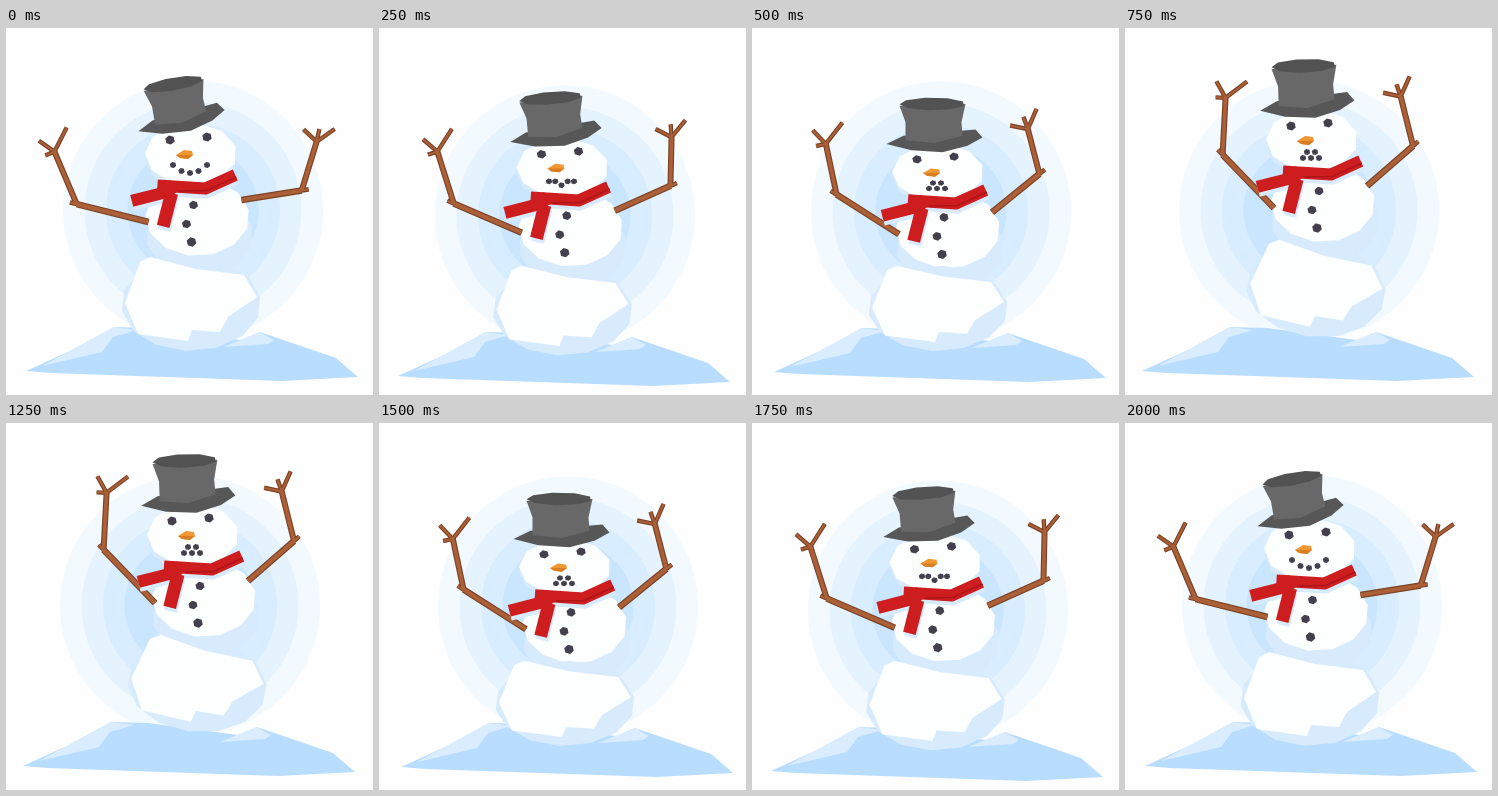
An HTML page with a canvas for the animation above (2250 ms loop, 367x367 px).

```html
<!DOCTYPE html>
<html lang="en">
<head>
<meta charset="utf-8">
<title>Jumping snowman</title>
<style>
  html, body { margin: 0; width: 100%; height: 100%; overflow: hidden; background: #fefefe; }
  canvas { display: block; width: 100vw; height: 100vh; }
</style>
</head>
<body>
<canvas width="367" height="367"></canvas>
<script>
const ctx = document.querySelector('canvas').getContext('2d');
const STEP = 250, RAD = Math.PI / 180;
const SHADE = '#d8ebfd', SNOW = '#fdfefe', COAL = '#433f4c', RED = '#cd1d1f';

// base: foot of the body; chest: sideways offset of the torso;
// left, right: angles of upper arm and forearm in degrees.
const stand = { ground: [0, 0], base: [186, 323], chest: 5.5, roll: 0, stretch: 1,
  tilt: -9.7, pout: 0, left: [194, 247], right: [-9, -73] };
const crouch = { ground: [2, 1], base: [187, 323], chest: 9, roll: 0, stretch: .908,
  tilt: 0, pout: 1, left: [212.5, 258], right: [-39, -104.5] };
const leap = { ground: [-3, 0], base: [188, 309], chest: 10, roll: 5, stretch: 1,
  tilt: -2, pout: 1, left: [226, 273], right: [-41, -104] };

const lerp = (a, b, t) => Array.isArray(a) ? a.map((v, i) => lerp(v, b[i], t)) : a + (b - a) * t;
const mix = (a, b, t) =>
  Object.fromEntries(Object.keys(stand).map(key => [key, lerp(a[key], b[key], t)]));

const sink = { ...mix(stand, crouch, .5), shift: [-2, 4.5] };
const peak = { ...mix(crouch, leap, 1.08), shift: [2.4, 3] };
const poses = [stand, sink, crouch, leap, peak, leap, crouch, sink, stand];

function trace(p) {
  ctx.beginPath();
  for (let i = 0; i < p.length; i += 2) ctx.lineTo(p[i], p[i + 1]);
}

function poly(color, ...p) {
  trace(p);
  ctx.fillStyle = color;
  ctx.fill();
}

function line(color, width, ...p) {
  trace(p);
  ctx.strokeStyle = color;
  ctx.lineWidth = width;
  ctx.stroke();
}

// Ellipse cut into n straight facets
function blob(color, x, y, rx, ry, n) {
  const p = [];
  for (let i = 0; i < n; i++) {
    const a = .3 + i / n * 2 * Math.PI;
    p.push(x + rx * Math.cos(a), y + ry * Math.sin(a));
  }
  poly(color, ...p);
}

const coal = (x, y, r) => blob(COAL, x, y, r, r * .95, 6);

function part(x, y, deg, scaleY, paint) {
  ctx.save();
  ctx.translate(x, y);
  ctx.scale(1, scaleY);
  ctx.rotate(deg * RAD);
  paint();
  ctx.restore();
}

function scenery() {
  for (let i = 0; i < 4; i++)
    blob(`hsl(208 100% ${97.5 - 2.6 * i}%)`, 187, 182.5, 130 - 21.5 * i, 130 - 21.5 * i, 90);
  poly('#b8ddff', 20, 343, 66, 322, 108, 299, 145, 300, 235, 312, 254, 304,
    330, 330, 352, 349, 275, 353, 45, 345);
  poly('#d9edff', 36, 338, 108, 299, 131, 302, 107, 309, 96, 324);
  poly('#d9edff', 217, 319, 254, 304, 268, 312, 262, 316);
}

function ball() {
  blob(SHADE, -1, -47, 70, 47, 14);
  poly(SNOW, -52, -89, -42, -94, 4, -82, 52, -76, 65, -54, 36, -34, 28, -19,
    0, -21, -4, -10, -54, -17, -67, -48);
}

function torso() {
  blob(SHADE, 2, 18, 54, 42, 12);
  blob(SNOW, 0, 0, 52, 39, 13);
  coal(-4, -12, 4.7);
  coal(-11, 7, 4.7);
  coal(-6, 25, 5);
}

function arm(x, y, upper, forearm, [a, b], fingers) {
  const reach = (x, y, deg, len) => [x + len * Math.cos(deg * RAD), y + len * Math.sin(deg * RAD)];
  const elbow = reach(x, y, a, upper), wrist = reach(...elbow, b, forearm);
  for (const [color, trim] of [['#7d4326', 0], ['#ab6038', 2.4]]) {
    line(color, 6.6 - trim, x, y, ...elbow);
    line(color, 4.6 - trim, ...elbow, ...reach(...elbow, a, 7));
    line(color, 6 - trim, ...elbow, ...wrist);
    for (const [turn, len] of fingers)
      line(color, 4.4 - trim, ...wrist, ...reach(...wrist, b + turn, len));
  }
}

function face(pout) {
  coal(-21, -15, 4.9);
  coal(16, -18, 4.9);
  poly('#ee9733', -15, 0, -7, -5, 1, -4, 2, 0, -3, 4, -11, 3);
  poly('#d97f22', -15, 0, 2, 0, -3, 4, -11, 3);
  for (let i = 0; i < 5; i++) {
    const s = i / 2 - 1;
    coal(lerp(17, 8, pout) * s - 1, lerp(18 - 8 * s * s, 17 - 6 * (i % 2), pout), 3.3);
  }
}

function hat() {
  poly('#575757', -48, 4, -31, -5, 41, -12, 48, -3, 33, 6, 8, 13, -23, 11);
  poly('#686868', -35, -38, -29, -20, -29, 0, 0, 3, 28, -5, 27, -20, 31, -40);
  blob('#525252', -2, -40, 33, 7, 9);
}

function scarfShape(color) {
  line(color, 12, -24, -4, 24, 0, 54, -13);
  line(color, 12, -50, 11, -12, 2);
  line(color, 13, -10, 4, -19, 37);
  blob(color, -12, -1, 9, 8, 7);
}

function scarf() {
  ctx.translate(1, 4);
  scarfShape(SHADE);
  ctx.translate(-1, -4);
  scarfShape(RED);
  line('#ad1519', 1.5, -3, 2, 25, 2, 55, -11);
}

function draw({ shift = [0, 0], ground, base: [x, y], chest, roll, stretch, tilt, pout, left, right }) {
  const cx = x + chest, cy = y - 134 * stretch;
  ctx.clearRect(0, 0, 367, 367);
  ctx.save();
  ctx.translate(...shift);
  part(...ground, 0, 1, scenery);
  part(cx, cy, 0, 1, torso);
  part(x, y, roll, stretch, ball);
  arm(cx - 49, cy + 5, 74, 57 * stretch, left, [[50, 27], [-32, 19], [-90, 10]]);
  arm(cx + 44, cy - 17, 61, 51 * stretch, right, [[38, 22], [-64, 18], [-5, 13]]);
  part(x - 1, y - 196 * stretch, 0, stretch, () => {
    blob(SHADE, 0, 4, 46, 31, 11);
    blob(SNOW, 0, -1, 46, 31, 11);
    face(pout);
    const turn = 1 + tilt * .008;
    ctx.rotate(tilt * RAD);
    ctx.translate(-3.5, -36);
    ctx.scale(turn, turn);
    hat();
  });
  part(cx - 16, y - 162 * stretch, -1, 1, scarf);
  ctx.restore();
}

function frame() {
  draw(poses[Math.floor(performance.now() / STEP) % poses.length]);
  requestAnimationFrame(frame);
}
ctx.lineJoin = 'round';
frame();
</script>
</body>
</html>
```
